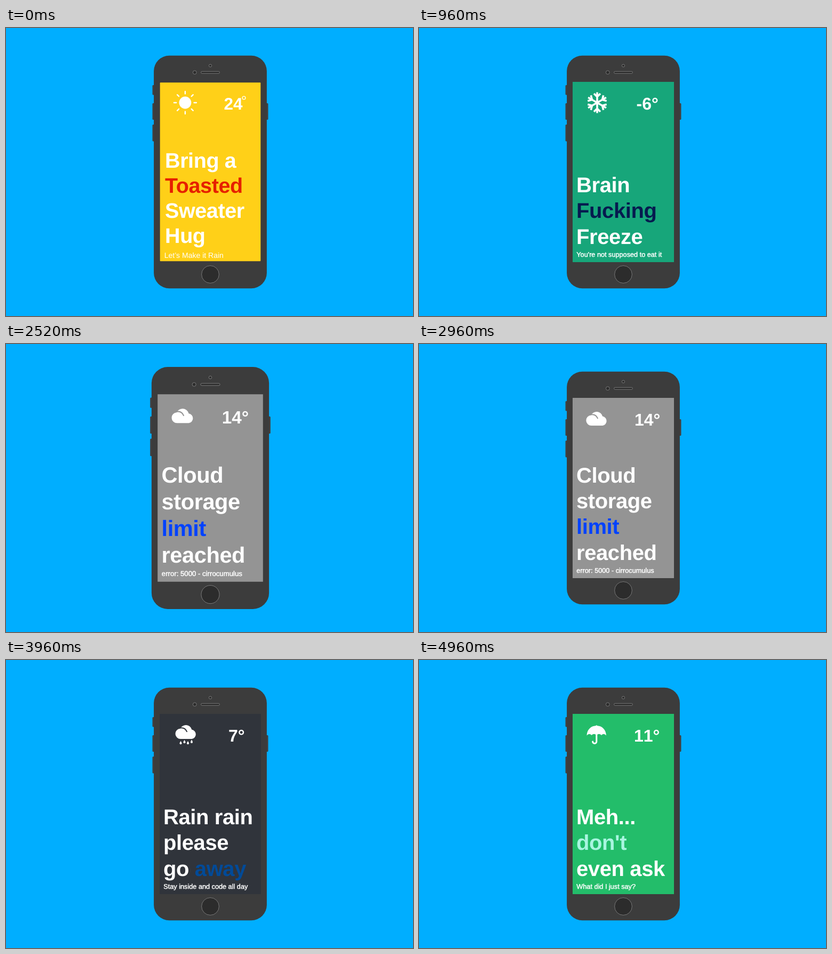
Animation, 763 px wide and 540 px high, one loop 5 s. Source, as an HTML page without scripts:

```html
<!DOCTYPE html>
<html lang="en">
<head>
<meta charset="utf-8">
<title>Weather phone</title>
<style>
  html, body { margin: 0; width: 100%; height: 100%; overflow: hidden; background: #00aeff; }
  svg { display: block; width: 763px; height: 540px; }
  text {
    font-family: "Liberation Sans", Arial, sans-serif;
    fill: #fff;
    text-rendering: geometricPrecision;
  }
  .title { font-size: 40px; font-weight: bold; letter-spacing: -.4px; }
  .temp { font-size: 32px; font-weight: bold; font-kerning: none; }
  .note { font-size: 12.7px; stroke: #fff; stroke-width: .45px; }
  .icon { fill: #fff; }
  .line { fill: none; stroke: #fff; }
  .lens { fill: #2c2c2c; stroke: #8a8a8a; stroke-width: .8; }

  .phone { transform-origin: 383px 270px; animation: pulse 5s infinite; }
  .screen { animation: 5s step-end infinite; }
  .sun { animation-name: sun; }
  .snow { animation-name: snow; }
  .thunder { animation-name: thunder; }
  .cloudy { animation-name: cloudy; }
  .rain { animation-name: rain; }
  .umbrella { animation-name: umbrella; }

  /* The phone jumps up in size at each screen change, then settles. */
  @keyframes pulse {
    0%, 9.28%, 18.4%, 29.28%, 38.4%, 50.08%, 59.2%, 70.08%, 79.2%, 90.08%, 99.2%, 100% {
      transform: scale(1);
      animation-timing-function: linear;
    }
    9.3%, 29.3% { transform: scale(1.032); }
    50.1%, 70.1%, 90.1% { transform: scale(1.04); }
    9.6%, 29.6% {
      transform: scale(1.032);
      animation-timing-function: cubic-bezier(.333, .667, .667, 1);
    }
    50.4%, 70.4%, 90.4% {
      transform: scale(1.04);
      animation-timing-function: cubic-bezier(.333, .667, .667, 1);
    }
  }
  @keyframes sun { 0% { visibility: visible; } 9.3%, 100% { visibility: hidden; } }
  @keyframes snow { 0%, 29.3%, 100% { visibility: hidden; } 9.3% { visibility: visible; } }
  @keyframes thunder { 0%, 50.1%, 100% { visibility: hidden; } 29.3% { visibility: visible; } }
  @keyframes cloudy { 0%, 70.1%, 100% { visibility: hidden; } 50.1% { visibility: visible; } }
  @keyframes rain { 0%, 90.1%, 100% { visibility: hidden; } 70.1% { visibility: visible; } }
  @keyframes umbrella { 0% { visibility: hidden; } 90.1%, 100% { visibility: visible; } }
</style>
</head>
<body>
<svg viewBox="0 0 763 540">
  <defs>
    <path id="rays" class="line" stroke-width="2.4" stroke-linecap="round"
      d="M0-21V-16.7M0 21V16.7M-21 0H-16.7M21 0H16.7"/>
    <path id="arm" class="line" stroke-width="3.6" d="M0 0V-19.5M-6-17 0-11 6-17"/>
    <g id="cloud">
      <path class="icon" d="M323.5 153A9.7 9.7 0 0 1 322.5 133.6Q326 127 333.5 127A11 11 0 0 1 344 135.6A8.8 8.8 0 0 1 344.3 153Z"/>
      <path d="M321.5 132.5Q331.5 130.5 335.2 140" fill="none" stroke="currentColor" stroke-width="2"/>
    </g>
    <path id="drop" class="icon" d="M0-3.6Q2 -.6 2 .8A2 2 0 0 1-2 .8Q-2-.6 0-3.6Z"/>
    <rect id="panel" x="288" y="101" width="190" height="338"/>
  </defs>

  <rect width="763" height="540" fill="#00aeff"/>
  <g class="phone">
    <g fill="#414141">
      <rect x="274.5" y="107" width="5" height="18.5" rx="1.5"/>
      <rect x="274.5" y="141" width="5" height="31" rx="1.5"/>
      <rect x="274.5" y="181" width="5" height="31.5" rx="1.5"/>
      <rect x="486.5" y="141" width="5" height="31" rx="1.5"/>
    </g>
    <rect x="277.1" y="51.8" width="211.8" height="436.4" rx="29" fill="#3c3c3c"/>
    <g class="lens">
      <circle cx="383" cy="70.6" r="2.6"/>
      <circle cx="353.8" cy="83.3" r="3.4"/>
      <rect x="365.6" y="81.4" width="34.8" height="3.8" rx="1.9"/>
      <circle cx="383" cy="462" r="16.4"/>
    </g>

    <g class="screen sun">
      <rect x="288.7" y="102.3" width="188.6" height="335" rx="1" fill="#ffd018"/>
      <g transform="translate(335.9 140)">
        <circle class="icon" r="11.4"/>
        <use href="#rays"/>
        <use href="#rays" transform="rotate(45)"/>
      </g>
      <text class="temp" x="408.5" y="153.3" style="font-size:31.5px">24</text>
      <circle class="line" cx="446" cy="131" r="2.9" stroke-width="1.4"/>
      <g class="title" style="font-size:39.5px">
        <text x="298" y="261.7">Bring a</text>
        <text x="298" y="308.7" style="fill:#e62000">Toasted</text>
        <text x="298" y="355.7">Sweater</text>
        <text x="298" y="402.7">Hug</text>
      </g>
      <text x="296.8" y="431" font-size="14">Let’s Make it Rain</text>
    </g>

    <g class="screen snow">
      <use href="#panel" fill="#17a67a"/>
      <g transform="translate(334 140)">
        <use href="#arm"/>
        <use href="#arm" transform="rotate(60)"/>
        <use href="#arm" transform="rotate(120)"/>
        <use href="#arm" transform="rotate(180)"/>
        <use href="#arm" transform="rotate(240)"/>
        <use href="#arm" transform="rotate(300)"/>
      </g>
      <text class="temp" x="407.5" y="153.3">-6°</text>
      <g class="title">
        <text x="295" y="308.2">Brain</text>
        <text x="295" y="356.4" style="fill:#061a4f">Fucking</text>
        <text x="295" y="404.6">Freeze</text>
      </g>
      <text class="note" x="295.3" y="428.7">You're not supposed to eat it</text>
    </g>

    <g class="screen thunder" color="#000">
      <use href="#panel"/>
      <use href="#cloud" y="-5.3"/>
      <path d="M329.5 138H338.5L336.8 142.5H340L336 148.5H329.5Z"/>
      <path class="icon" d="M329.8 147H337.3L335.5 150.3H337.4L331.8 158 332.8 152H329.8Z"/>
      <text class="temp" x="404" y="153.3">10°</text>
      <g class="title">
        <text x="295" y="308.2">Fucking</text>
        <text x="295" y="356.4" style="fill:#ffff3c">Thunder</text>
        <text x="295" y="404.6">Strike</text>
      </g>
      <text class="note" x="295.3" y="428.7">Unplug those devices</text>
    </g>

    <g class="screen cloudy" color="#949494">
      <use href="#panel" fill="#949494"/>
      <use href="#cloud"/>
      <text class="temp" x="404" y="153.3">14°</text>
      <g class="title">
        <text x="295" y="260">Cloud</text>
        <text x="295" y="308.2">storage</text>
        <text x="295" y="356.4" style="fill:#0042ff">limit</text>
        <text x="295" y="404.6">reached</text>
      </g>
      <text class="note" x="295.3" y="428.7">error: 5000 - cirrocumulus</text>
    </g>

    <g class="screen rain" color="#30343b">
      <use href="#panel" fill="#30343b"/>
      <use href="#cloud" x="4.2" y="-5"/>
      <use href="#drop" x="327.5" y="155.5"/>
      <use href="#drop" x="334.5" y="153.5"/>
      <use href="#drop" x="341" y="155.5"/>
      <use href="#drop" x="348" y="153.2"/>
      <text class="temp" x="417" y="153.3">7°</text>
      <g class="title">
        <text x="295" y="308.2">Rain rain</text>
        <text x="295" y="356.4">please</text>
        <text x="295" y="404.6">go <tspan fill="#004a98">away</tspan></text>
      </g>
      <text class="note" x="295.3" y="428.7">Stay inside and code all day</text>
    </g>

    <g class="screen umbrella">
      <use href="#panel" fill="#23bd6a"/>
      <path class="icon" d="M314.5 141.5C315 130 323 123.6 331.5 123.3Q332.8 121 334.1 123.3C342.5 123.6 350.5 130 351 141.5Q346.5 136.5 342 141Q337.5 136.5 332.8 141Q328 136.5 323.5 141Q319 136.5 314.5 141.5Z"/>
      <path class="line" stroke-width="3" stroke-linecap="round" d="M332.8 139V153A3.6 3.6 0 0 1 325.6 153"/>
      <text class="temp" x="403" y="153.3">11°</text>
      <g class="title">
        <text x="295" y="308.2">Meh...</text>
        <text x="295" y="356.4" style="fill:#a8f5e0">don't</text>
        <text x="295" y="404.6">even ask</text>
      </g>
      <text class="note" x="295.3" y="428.7">What did I just say?</text>
    </g>
  </g>
</svg>
</body>
</html>
```
